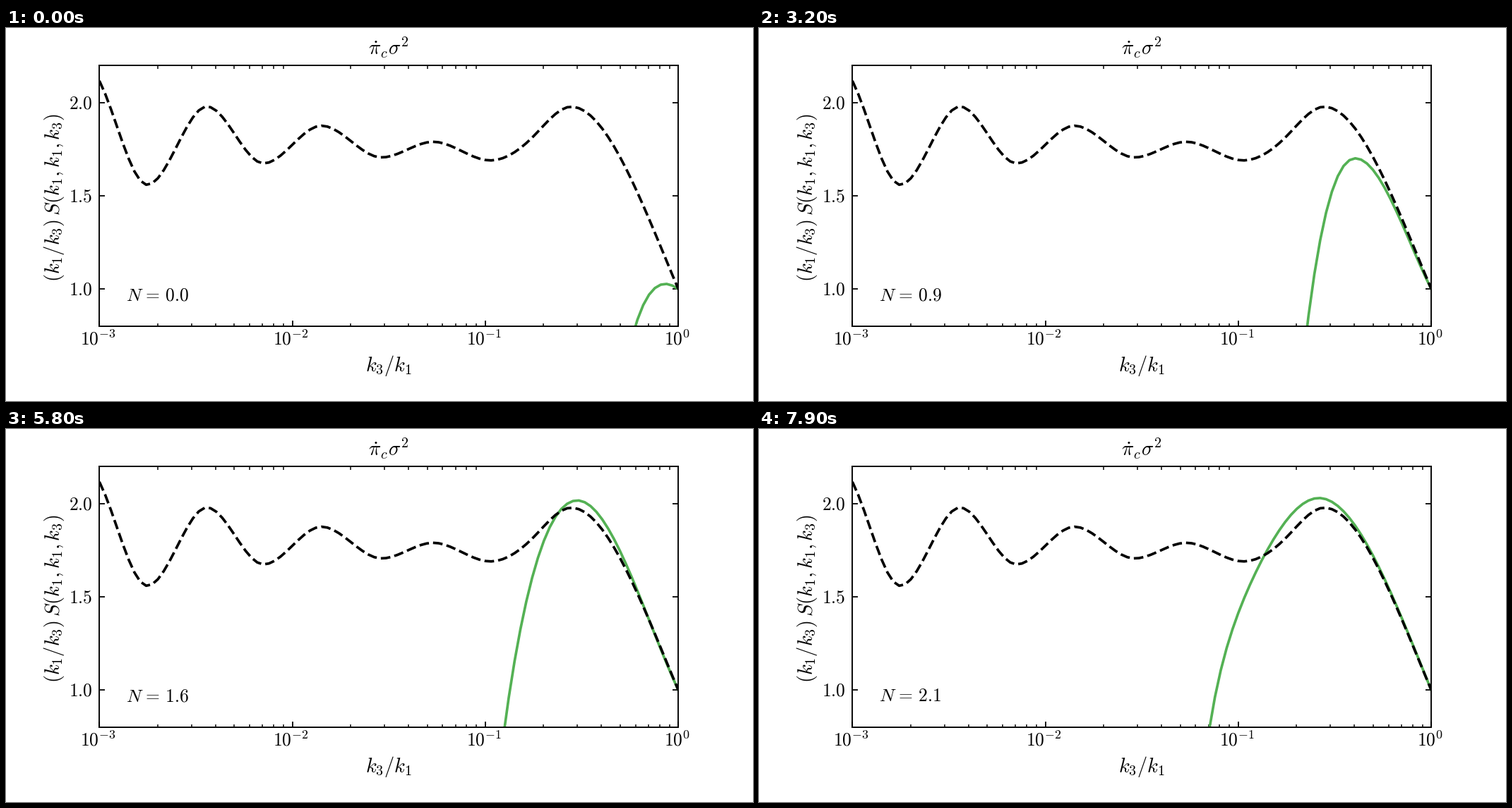
Write a matplotlib script that moves like this. It is 1058 px wide and 529 px high and loops after 8000 ms.

```python
import numpy as np
import matplotlib.pyplot as plt
from matplotlib.animation import FuncAnimation

W, H, DPI = 1058, 529, 92
FRAMES, STEP = 80, 100
LEFT, RIGHT = 0.125 * W, 0.9 * W
FLOOR, CEIL = 0.8, 2.2
PT = 72 / DPI                      # points per pixel
SMALL, LARGE = 25.6, 28.6          # text sizes in pixels
LINE = 3.67 * PT
GREEN = "#54b154"

plt.rcParams["mathtext.fontset"] = "cm"

decade = np.linspace(-3, 0, 100)
ratio = 10 ** decade


def hermite(x, xk, yk, mk):
    """Cubic curve through (xk, yk) with slopes mk."""
    j = np.clip(np.searchsorted(xk, x) - 1, 0, len(xk) - 2)
    h = xk[j + 1] - xk[j]
    t = (x - xk[j]) / h
    ease = t * t * (3 - 2 * t)
    bend = t * (1 - t) * ((1 - t) * mk[j] - t * mk[j + 1])
    return yk[j] + (yk[j + 1] - yk[j]) * ease + h * bend


def dashed_curve():
    # Crests and troughs, plus one point on the last rise
    xk = np.array([-3, -2.752, -2.443, -2.149, -1.849, -1.538,
                   -1.270, -0.974, -0.747, -0.555, 0])
    yk = np.array([2.117, 1.559, 1.979, 1.674, 1.876, 1.706,
                   1.790, 1.690, 1.823, 1.978, 1])
    slopes = np.zeros(len(xk))
    slopes[[0, -3, -1]] = -2.03, 1.06, -2.46
    return hermite(decade, xk, yk, slopes)


def green_curve(i):
    """A bump that rises and spreads to small ratios as time v goes on."""
    v = i / (FRAMES - 1)
    d = -decade
    peak = 0.066 + 0.604 * (1 - np.exp(-1.927 * v))
    edge = 0.223 + 1.359 * v - 1.039 * v**2 + 0.606 * v**3
    top = 1.028 + 0.746 * v + 5.172 * v**2 - 8.727 * v**3 + 3.811 * v**4

    a = 1.9 - 1.87 * (v - 0.58) ** 2
    s = 1 - d / peak
    right = top - (top - 1) * (a * s**2 + (1 - a) * s**3)

    late = v**8
    s = (d - peak) / (edge - peak)
    fall = ((0.68 + 0.57 * late) * s**2 + (0.32 - 0.82 * late) * s**3
            + 0.25 * late * s**8)
    left = top - (top - FLOOR) * fall
    return np.where(d < peak, right, left)


fig = plt.figure(figsize=(W / DPI, H / DPI), dpi=DPI, facecolor="white")
ax = fig.add_axes([0.125, 0.2, 0.775, 0.7])
ax.set_xscale("log")
ax.set_xlim(1e-3, 1)
ax.set_ylim(FLOOR, CEIL)
ax.set_yticks([1, 1.5, 2])
for which, length, width in (("major", 8, 1.8), ("minor", 4.5, 1.5)):
    ax.tick_params(which=which, direction="in", top=which == "minor",
                   right=True, length=length * PT, width=width * PT,
                   labelbottom=False, labelleft=False)
for side in ax.spines.values():
    side.set_linewidth(1.9 * PT)


def label(x, y, text, size=SMALL, ha="center", **kw):
    return fig.text(x / W, 1 - y / H, text, fontsize=size * PT, ha=ha,
                    va="baseline", rotation_mode="anchor", **kw)


for n in range(4):
    label(LEFT + n * (RIGHT - LEFT) / 3 - 1.8, 449.5, f"$10^{{{n - 3}}}$")
for n in (1, 1.5, 2):
    label(122.8, 642.9 - 264.4 * n, f"${n:.1f}$", ha="right")
mid = (LEFT + RIGHT) / 2
label(mid - 0.8, 38, r"$\dot{\pi}_c\sigma^2$", LARGE)
label(mid, 486.5, r"$k_3/k_1$", LARGE)
label(76, 241, r"$(k_1/k_3)\,S(k_1,k_1,k_3)$", LARGE, rotation=90)
count = label(170.3, 386.5, "", ha="left")

line, = ax.plot([], [], color=GREEN, lw=LINE)
ax.plot(ratio, dashed_curve(), "--", color="black", lw=LINE)


def draw(i):
    line.set_data(ratio, green_curve(i))
    count.set_text(rf"$N\hspace{{0.13}}=\hspace{{0.13}}{0.027 * i:.1f}$")
    return line, count


anim = FuncAnimation(fig, draw, frames=FRAMES, interval=STEP,
                     repeat=True, repeat_delay=0)
plt.show()
```
